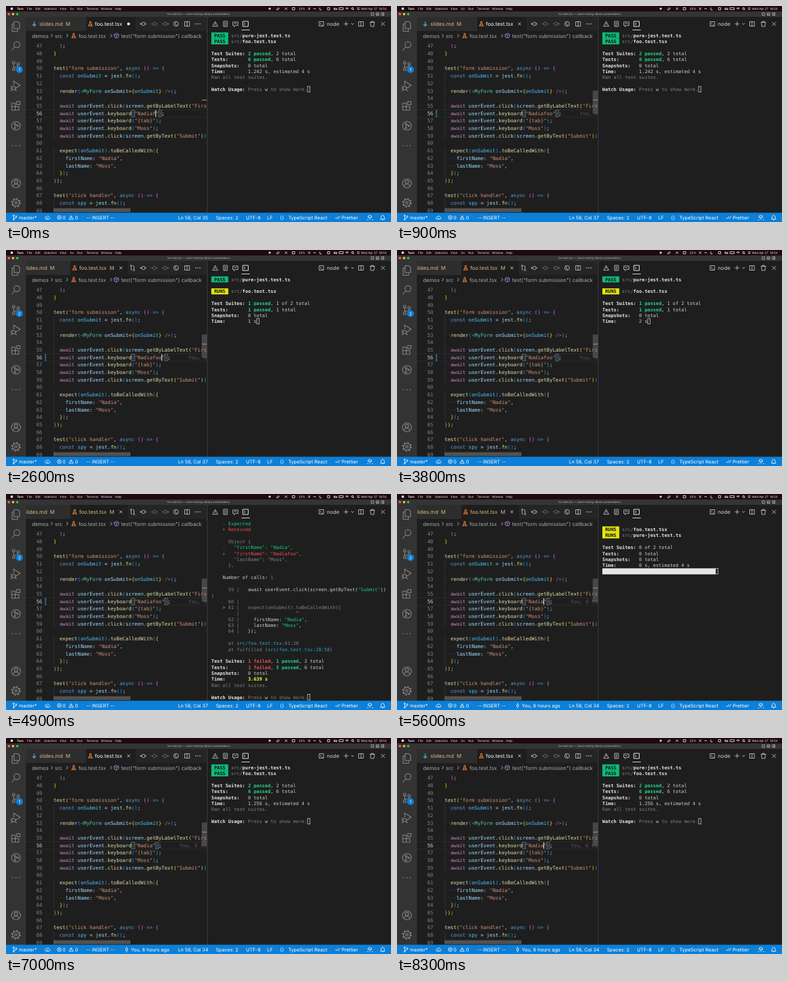
Animation of 600x338 px, one loop 8.4 s. Source, as an HTML page:

```html
<!DOCTYPE html>
<html lang="en">
<head>
<meta charset="utf-8">
<title>Test watch mode</title>
<style>
  html, body { margin: 0; width: 100%; height: 100%; overflow: hidden; background: #1e1e1e; }
  svg { display: block; width: 600px; height: 338px; }
  text { font: 8.15px Inter, "Open Sans", sans-serif; white-space: pre; text-rendering: geometricPrecision; fill: #ccc; }
  .editor text { font: 7.774px "DejaVu Sans Mono", monospace; }
  .term text { font: 7.31px "DejaVu Sans Mono", monospace; }
  .menu text { font-size: 4.6px; fill: #eee; }
  .status text { font-size: 7.5px; fill: #fff; }
  .crumbs text { fill: #a9a9a9; }
  .line { fill: none; stroke: #c5c5c5; stroke-width: .9; }
  .side { fill: none; stroke: #868686; stroke-width: 1.1; }
  .white { fill: none; stroke: #fff; stroke-width: .8; }
  .editor .num { fill: #858585; }
  .editor .blame { fill: #565656; }
  .dot { fill: #414141; }
  .b { font-weight: 700; fill: #e5e5e5; }
  .d { fill: #808080; }
  .g { fill: #16c784; }
  .r { fill: #f14c4c; }
  .c { fill: #29a6c9; }
  .G, .R, .Y { font-weight: 700; }
  .G { fill: #23d18b; }
  .R { fill: #f14c4c; }
  .Y { fill: #f5f543; }
  .P, .U { font-weight: 700; fill: #111; }
</style>
</head>
<body>
<svg viewBox="0 0 600 338">
  <rect width="600" height="338" fill="#1e1e1e"/>
  <g class="editor">
    <path d="M31 162.3H313M31 174H313" stroke="#2b2b2b"/>
    <path d="M74.4 103.5v105.3M74.4 220.5v46.8M74.4 302.4v22" stroke="#383838" stroke-width=".7"/>
    <g id="lines"></g>
    <g id="edit"></g>
    <rect x="74" y="316.5" width="120" height="6" fill="#858585" opacity=".5"/>
    <rect id="thumb" x="305" y="132.5" width="8.5" height="36" fill="#797979" opacity=".45"/>
    <path d="M305.5 147.3h8" stroke="#8a8a8a" stroke-width="1.3"/>
  </g>

  <rect x="31" y="17" width="283" height="22" fill="#252526"/>
  <g id="tabs"></g>
  <g class="line">
    <path d="M211.5 28h-2.5l1.5-1.5M209 28l1.5 1.5M217 28h2"/><circle cx="214.3" cy="28" r="2.6"/>
    <g opacity=".45">
      <path d="M225.5 28h3M233.6 28h3"/><circle cx="231" cy="28" r="2.6"/>
      <path d="M243 28h2.4M250.6 28h3l-1.5-1.5M253.6 28l-1.5 1.5"/><circle cx="248" cy="28" r="2.6"/>
    </g>
    <circle cx="265" cy="28" r="3.7"/><path d="M264 25.5v3.5l2.5 1.2"/>
    <path d="M278.5 24.5h7.5v7h-7.5zM282.2 24.5v7"/>
    <path d="M295 28h1.4M298.3 28h1.4M301.6 28h1.4" stroke-width="1.3"/>
  </g>
  <g class="crumbs">
    <text x="40.5" y="49.5">demos</text><text x="76" y="49.5">src</text>
    <text x="113" y="49.5">foo.test.tsx</text><text x="179.5" y="49.5">test("form submission") callback</text>
    <path class="line" d="M70 44l2.5 2.5-2.5 2.5M94 44l2.5 2.5-2.5 2.5M162.5 44l2.5 2.5-2.5 2.5"/>
    <path d="M172 42.7l3.4 1.7v4l-3.4 1.8-3.4-1.8v-4zM168.6 44.4l3.4 1.7 3.4-1.7M172 46.1v4" fill="none" stroke="#b180d7" stroke-width=".9"/>
  </g>
  <g id="crumbIcon"></g>

  <rect x="313" y="17" width="287" height="307" fill="#1e1e1e"/>
  <path d="M313.5 17V324" stroke="#3c3c3c"/>
  <g class="line">
    <path d="M326 24.3l4 7.4h-8zM326 27v2.5"/>
    <path d="M339 24h6v8h-6zM340.5 26.5h3M340.5 28.5h3M340.5 30.5h2"/>
    <path d="M353.5 25h8v5.5h-4l-2 2v-2h-2zM355.5 27.7h4"/>
    <path d="M369 24h8.5v8H369zM371 26.3l1.8 1.7-1.8 1.7" stroke="#fff"/>
    <path d="M367 37.5h13" stroke="#e7e7e7"/>
    <path d="M488 24.5h7v7h-7zM489.6 26.5l1.6 1.5-1.6 1.5M492 30h1.7"/>
    <path d="M526.5 28h7M530 24.5v7M538 27l2 2 2-2"/>
    <path d="M549.5 24.5h7.5v7h-7.5zM553.2 24.5v7"/>
    <path d="M567 25.5h8M568 25.5l.5 6.5h5l.5-6.5M569.7 25.5v-1.5h2.6v1.5"/>
    <path d="M584.5 25l6 6M590.5 25l-6 6"/>
  </g>
  <text x="500" y="30.8">node</text>
  <g class="term" id="term"></g>

  <rect y="17" width="31" height="307" fill="#333"/>
  <g class="side">
    <path d="M12.5 24.5h6l2.7 2.8v8h-8.7zM12.5 28h-3v11.5h8.5v-4"/>
    <circle cx="17" cy="60.5" r="4.6"/><path d="M13.7 64l-5 5.5"/>
    <circle cx="12" cy="88.5" r="2"/><circle cx="19" cy="90.5" r="2"/><circle cx="12" cy="99" r="2"/>
    <path d="M12 90.5v6.5M19 92.5q0 3-7 3.5"/>
    <path d="M12 124v-6.5l10 6.5-8 5.5"/><circle cx="12" cy="128.5" r="2.8"/><path d="M7.5 125.5l2 1.5M7 129h2M7.5 133l2.2-2M14.5 131l2 2"/>
    <path d="M9 152h5.5v11H9zM9 157.5h11v5.5H9zM16.7 149.5h5v5h-5z"/>
    <circle cx="15.5" cy="187.5" r="6.8"/><circle cx="14" cy="184.5" r="1.2"/><circle cx="14" cy="191" r="1.2"/><circle cx="18.5" cy="187.5" r="1.2"/><path d="M14 185.7v4.1M15 185.5l2.5 1.5"/>
    <path d="M9.5 218.5h1.6M14.7 218.5h1.6M19.9 218.5h1.6" stroke-width="1.6"/>
    <circle cx="15.5" cy="277.5" r="7"/><circle cx="15.5" cy="275.5" r="2.6"/><path d="M10.8 282.5q1-3.7 4.7-3.7t4.7 3.7"/>
    <circle cx="15.5" cy="308" r="5.3"/><circle cx="15.5" cy="308" r="1.9"/>
    <circle cx="15.5" cy="308" r="6.5" stroke-width="2" stroke-dasharray="2.1 3"/>
  </g>
  <circle cx="21" cy="99.5" r="5.4" fill="#0c7fd8"/>
  <text id="badge" x="21" y="102" text-anchor="middle" style="font-size:6.8px;fill:#fff"></text>

  <g class="menu">
    <rect width="600" height="9" fill="#1f0a10"/>
    <rect y="8.5" width="600" height="8.5" fill="#343435"/>
    <circle cx="9" cy="4.2" r="1.9" fill="#eee"/>
    <g id="menu"></g>
    <text x="593" y="5.9" text-anchor="end">Wed Apr 27  18:54</text>
    <text x="300" y="14.4" text-anchor="middle" style="font-size:4.3px;fill:#bbb">foo.test.tsx — react-testing-library-presentation</text>
    <circle cx="4.5" cy="12.7" r="1.9" fill="#ff5f57"/><circle cx="11" cy="12.7" r="1.9" fill="#febc2e"/><circle cx="17.5" cy="12.7" r="1.9" fill="#28c840"/>
    <g class="white">
      <path d="M421.5 5.5l3-3 1.5 1.5-2.5 2zM434.5 6l3.5-3.5M435 2.5l3.5 3.5"/>
      <path d="M446 2.5h4v3.5h-4zM471 2.5l3 3.5M474 2.5l-3 3.5M479 4.2h4M489 2.5v3.5h3M501 2.5h3.5v3.5H501z"/>
      <path d="M511 3.5h4l1 2h-5zM519 2.7h6.5v3H519zM529 3.7q2.5-2 5 0M530 4.9q1.5-1 3 0"/>
      <circle cx="540" cy="4" r="1.5"/><path d="M541 5l1.3 1.3M547 3h4M547 5.3h4"/>
      <path d="M569 10.7h4v4h-4zM577 10.7h4v4h-4zM577 13h4M585 10.7h4v4h-4zM587.5 10.7v4" stroke="#bbb"/>
    </g>
    <text x="456" y="5.9">23%</text>
    <circle cx="411" cy="4.2" r="1.6" fill="#ddd"/>
  </g>

  <g class="status">
    <rect y="323.5" width="600" height="14.5" fill="#0c7fd8"/>
    <g class="white">
      <circle cx="12" cy="328" r="1.1"/><circle cx="12" cy="334" r="1.1"/><circle cx="16" cy="329.5" r="1.1"/><path d="M12 329v4M16 330.5q0 1.5-3.5 2"/>
      <path d="M62.5 333.5q-2.5-.5-1.5-2.5 .8-1.3 2-1 1-2 3-1.2 1.3 .5 1.5 1.8 2 .7 1 2.3-.5 .6-1.5 .6zM64.8 334v-3"/>
      <circle cx="83" cy="331" r="3"/><path d="M81.8 329.8l2.4 2.4M84.2 329.8l-2.4 2.4"/>
      <path d="M101.5 328l3.3 5.8h-6.6zM101.5 330v2"/>
      <path d="M513 331l1.8 2 3-4M517 332.5l.8 .5 3-4"/>
      <path d="M565 328h4l1 3h-6zM567 331v3.5M562.5 334.5h2M570 334.5h2"/>
      <path d="M583.5 333.5h7l-1-1.5v-2q-.5-2.3-2.5-2.3t-2.5 2.3v2zM586 334.8h2"/>
    </g>
    <g id="status"></g>
    <g id="author"><g class="white"><circle cx="188" cy="331" r="1.7"/><path d="M188 326.5v2.8M188 332.7v2.8"/></g><text x="194.5" y="333.7">You, 6 hours ago</text></g>
    <text id="pos" x="268" y="333.7"></text>
  </g>
</svg>
<script>
const LOOP = 8400;
const CHAR = 4.68, EDIT_X = 74, LINE_H = 11.7;
const COL = 4.4, TERM_X = 320, ROW_H = 9.38;
const $ = id => document.getElementById(id);
const esc = s => s.replace(/&/g, '&amp;').replace(/</g, '&lt;');
const text = (x, y, body, attrs = '') => `<text x="${x}" y="${y}" ${attrs}>${body}</text>`;
const rect = (x, y, w, h, attrs) => `<rect x="${x}" y="${y}" width="${w}" height="${h}" ${attrs}/>`;
const labels = (items, y) => items.map(([x, s]) => text(x, y, s)).join('');

// Editor
const BRACKETS = ['#ffd700', '#da70d6', '#179fff'];
let depth = 2;

function tokenColor(tok, next) {
  if (tok[0] === '"') return '#ce9178';
  if (tok === 'await') return '#c586c0';
  if (/^(async|const|=>)$/.test(tok)) return '#569cd6';
  if (tok === '<' || tok === '/>') return '#808080';
  if (tok === 'MyForm') return '#4ec9b0';
  if (/[({]/.test(tok)) return BRACKETS[depth++ % 3];
  if (/[)}]/.test(tok)) return BRACKETS[--depth % 3];
  if (!/\w/.test(tok)) return '#d4d4d4';
  if (next === '(') return '#dcdcaa';
  return /^(onSubmit|spy)$/.test(tok) && next !== '=' ? '#4fc1ff' : '#9cdcfe';
}

function highlight(src) {
  return src.replace(/"[^"]*"|\/>|=>|\w+|./g, (tok, at) => {
    const body = esc(tok).replace(/ /g, '<tspan class="dot">·</tspan>');
    return `<tspan fill="${tokenColor(tok, src[at + tok.length])}">${body}</tspan>`;
  });
}

const lineY = n => 65.3 + (n - 47) * LINE_H;
const colX = c => EDIT_X + c * CHAR;

const SCRIPT = `  );
}

test("form submission", async () => {
  const onSubmit = jest.fn();

  render(<MyForm onSubmit={onSubmit} />);

  await userEvent.click(screen.getByLabelText("First name"));

  await userEvent.keyboard("{tab}");
  await userEvent.keyboard("Moss");
  await userEvent.click(screen.getByText("Submit"));

  expect(onSubmit).toBeCalledWith({
    firstName: "Nadia",
    lastName: "Moss",
  });
});

test("click handler", async () => {
  const spy = jest.fn();
`;
$('lines').innerHTML = SCRIPT.split('\n').map((src, i) => {
  const n = 47 + i, color = n === 56 ? 'style="fill:#d0d0d0"' : '';
  return text(47.2, lineY(n), n, `class="num" ${color}`) + text(EDIT_X, lineY(n), highlight(src));
}).join('');

function editLine({ typed, caret, changed, blame }) {
  const src = `  await userEvent.keyboard("Nadia${typed}");`;
  const box = c => rect(colX(c), 163.2, CHAR, 10, 'fill="none" stroke="#888" stroke-width=".7"');
  depth = 2;
  return text(EDIT_X, lineY(56), highlight(src)) + box(26) + box(src.length - 2) +
    (caret ? rect(colX(33 + typed.length) - .3, 163, 1.2, 10.5, 'fill="#d8d8d8"') : '') +
    (changed ? '<path d="M61.5 163v11" stroke="#2f9bd0" stroke-width="1.8" stroke-dasharray="1.5 .8"/>' : '') +
    (blame ? text(colX(src.length + 6), lineY(56), blame, 'class="blame"') : '');
}

// Tabs
const flask = (x, y) => `<path transform="translate(${x} ${y})" d="M-1.5-3.5h3M-.9-3.5v2.5L-3 3.2h6L.9-1v-2.5M-2 1.3h4" fill="none" stroke="#e37933" stroke-width="1.1"/>`;
const cross = (x, y) => `<path class="line" d="M${x - 2.3} ${y - 2.3}l4.6 4.6m0-4.6l-4.6 4.6"/>`;
const COMPARE = '<g class="line"><path d="M195 25v5q0 1.5 2 1.5M199.5 31v-5q0-1.5-2-1.5"/><circle cx="195" cy="24.5" r="1"/><circle cx="199.5" cy="31.5" r="1"/></g>';

function tabs({ modified, dirty }) {
  const dx = modified ? -24.5 : 0, edge = 125 + dx;
  const gold = 'style="fill:#d9b985"', close = modified ? 179 : 191;
  return rect(31, 17, edge - 31, 22, 'fill="#2d2d2d"') +
    rect(edge, 17, close + 11 - edge, 22, 'fill="#1e1e1e"') +
    (modified ? '' : '<path d="M44 24.5v6.5M41.3 28.5l2.7 2.8 2.7-2.8" fill="none" stroke="#519aba" stroke-width="1.5"/>') +
    text(52 + dx, 30.8, 'slides.md', gold) + text(93 + dx, 30.8, 'M', gold) +
    flask(131.5 + dx, 28) +
    text(138.5 + dx, 30.8, 'foo.test.tsx', modified ? gold : 'style="fill:#fff"') +
    (modified ? text(161.5, 30.8, 'M', gold) + COMPARE : '') +
    (dirty ? `<circle cx="${close}" cy="28" r="2.3" fill="#ddd"/>` : cross(close, 28));
}

// Terminal: [style|text] marks a styled run
const rowY = r => 48.6 + r * ROW_H;
const badge = (kind, file) => `[${kind}| ${kind === 'P' ? 'PASS' : 'RUNS'} ] [d|src/][b|${file}]`;
const PURE = 'pure-jest.test.ts', FOO = 'foo.test.tsx';
const summary = (suites, tests, time) => [
  `[b|Test Suites:] ${suites} total`,
  `[b|Tests:]       ${tests} total`,
  '[b|Snapshots:]   0 total',
  `[b|Time:]        ${time}`];
const FOOTER = ['[d|Ran all test suites.]', '', '[b|Watch Usage:][d| Press ]w[d| to show more.]'];

const passed = time => [badge('P', PURE), badge('P', FOO), '',
  ...summary('[G|2 passed], 2', '[G|6 passed], 6', `${time} s, estimated 4 s`), ...FOOTER];

const FAILED = [
  '    [g|- Expected]', '    [r|+ Received]', '',
  '      [d|Object {]',
  '    [g|-   "firstName": "Nadia",]',
  '    [r|+   "firstName": "Nadiafoo",]',
  '    [d|    "lastName": "Moss",]',
  '      [d|},]', '',
  '    Number of calls: [r|1]', '',
  '      [d|59 |]   await userEvent.click(screen.getByText([g|"Submit"]))', ';',
  '      [d|60 |]',
  '    [R|>] [d|61 |   expect(onSubmit).toBeCalledWith({]',
  '         [d||]                    [R|^]',
  '      [d|62 |]     firstName: [g|"Nadia"],',
  '      [d|63 |]     lastName: [g|"Moss"],',
  '      [d|64 |]   });', '',
  '      [d|at ][c|src/foo.test.tsx][d|:61:20]',
  '      [d|at fulfilled (][c|src/foo.test.tsx:28:58][d|)]', '',
  ...summary('[R|1 failed], [G|1 passed], 2', '[R|1 failed], [G|5 passed], 6', '[Y|3.639 s]'), ...FOOTER];

function running(seconds, estimate) {
  const time = seconds + ' s' + (seconds < estimate ? `, estimated ${estimate} s` : '');
  const rows = seconds < 1
    ? ['', badge('U', FOO), badge('U', PURE), '', ...summary('0 of 2', '0', time)]
    : [badge('P', PURE), '', badge('U', FOO), '', ...summary('[G|1 passed], 1 of 2', '[G|1 passed], 1', time)];
  if (estimate > 2) rows.push(' '.repeat(40));
  return rows;
}

function terminal(rows, done) {
  const run = /\[(\w)\|([^\]]*)\]/g;
  let out = '';
  rows.forEach((row, r) => {
    const top = 41.3 + r * ROW_H;
    if (/^\[[PU]/.test(row))
      out += rect(TERM_X, top, COL * 6, ROW_H, `fill="${row[1] === 'P' ? '#0dbc79' : '#e5e510'}"`);
    if (/^ {40}$/.test(row)) {
      out += rect(TERM_X, top, COL * 40, ROW_H, 'fill="#e5e5e5"') +
        rect(TERM_X, top, COL * 40 * done, ROW_H, 'fill="#0dbc79"');
    }
    out += text(TERM_X, rowY(r), esc(row).replace(run, '<tspan class="$1">$2</tspan>'));
  });
  const last = rows.length - 1, width = rows[last].replace(run, '$2').length;
  return out + rect(TERM_X + width * COL + .4, 41.5 + last * ROW_H, COL - .6, ROW_H - .8,
    'fill="none" stroke="#ccc" stroke-width=".8"');
}

// Timeline
function screenAt(t) {
  if (t < 1000) return terminal(passed('1.242'));
  if (t < 4640) return terminal(running(Math.floor((t - 1000) / 1000), 1));
  if (t < 5500) return terminal(FAILED);
  if (t < 6756) {
    const s = Math.floor((t - 5500) / 1000);
    return terminal(running(s, 4), s / 4);
  }
  return terminal(passed('1.256'));
}

function typedAt(t) {
  const n = t < 150 ? 1 : t < 300 ? 2 : t < 5000 ? 3 : t < 5100 ? 2 : t < 5200 ? 1 : 0;
  return 'foo'.slice(0, n);
}

function blink(t) {
  const lastKey = t < 300 ? t : t < 5000 ? 300 : t < 5200 ? t : 5200;
  return Math.floor((t - lastKey) / 500) % 2 === 0;
}

const shown = {};
function put(id, html) {
  if (shown[id] !== html) $(id).innerHTML = shown[id] = html;
}

function draw(t) {
  const typed = typedAt(t), modified = t >= 2000 && t < 6600;
  const committed = t >= 5400;
  put('edit', editLine({
    typed,
    caret: blink(t),
    changed: t >= 800 && t < 5200,
    blame: committed ? 'You, 6 hours ago' : t >= 800 && t < 5000 ? 'You, now' : ''
  }));
  put('tabs', tabs({ modified, dirty: t < 800 || (t >= 5000 && t < 5300) }));
  put('term', screenAt(t));
  put('badge', modified ? '2' : '1');
  put('pos', `Ln 56, Col ${34 + typed.length}`);
  $('author').style.display = committed ? '' : 'none';
  $('thumb').style.display = t < 400 ? 'none' : '';
}

put('crumbIcon', flask(105.5, 46.5));
put('menu', text(17, 5.9, 'Tarn', 'style="font-weight:700"') + labels([
  [33, 'File'], [45.5, 'Edit'], [59, 'Selection'], [83.5, 'View'], [99.5, 'Go'],
  [111, 'Run'], [125, 'Terminal'], [148, 'Window'], [170, 'Help']], 5.9));
put('status', labels([
  [20, 'master*'], [88, '0'], [107.5, '0'], [125, '-- INSERT --'], [327, 'Spaces: 2'],
  [374, 'UTF-8'], [407, 'LF'], [427, '{}'], [440, 'TypeScript React'], [523, 'Prettier']], 333.7));

const start = performance.now();
function tick() {
  draw((performance.now() - start) % LOOP);
  requestAnimationFrame(tick);
}
tick();
</script>
</body>
</html>
```
